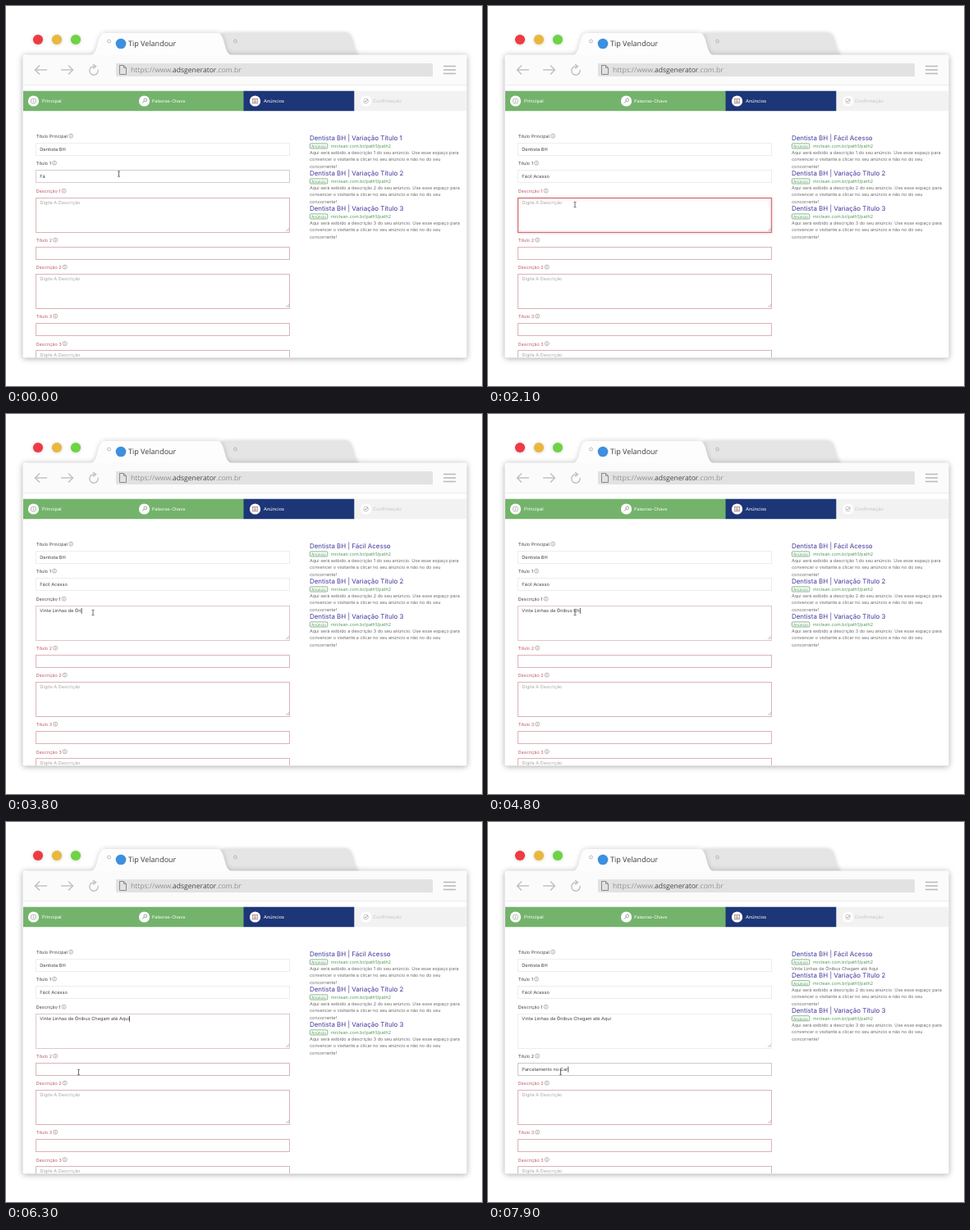
Animation of 580 by 464 pixels, one loop 8000 ms. Source, as an HTML page with a canvas:

```html
<!DOCTYPE html>
<html lang="pt-BR">
<head>
<meta charset="utf-8">
<title>Tip Velandour</title>
<style>
  html, body { margin: 0; width: 580px; height: 464px; overflow: hidden; background: #fff; }
  canvas { display: block; }
</style>
</head>
<body>
<canvas id="stage" width="580" height="464"></canvas>
<script>
const ctx = document.getElementById('stage').getContext('2d');
ctx.textRendering = 'geometricPrecision';

const LOOP = 8000;
const PAGE_FONT = 'Inter, sans-serif';
const BAR_FONT = '"Open Sans", sans-serif';
const INK = '#444', RED = '#bd5560', PINK = '#dcb3b7', SOFT_PINK = '#e0c8ca', PALE = '#ededed';
const CLICK_DESC = 1800, CLICK_TITLE2 = 6500;

// Each key is [time, characters typed so far].
const typing = {
  title1: { text: 'Fácil Acesso', keys: [[0, 2], [100, 3], [200, 4], [300, 6], [700, 7], [800, 9], [900, 10], [1000, 11], [1100, 12]] },
  desc1: {
    text: 'Vinte Linhas de Ônibus Chegam até Aqui',
    keys: [[2300, 3], [2500, 4], [2600, 5], [2700, 7], [2800, 9], [2900, 10], [3000, 12], [3100, 13], [3200, 14], [3300, 16],
      [3700, 17], [3800, 18], [3900, 20], [4100, 21], [4300, 22], [4400, 23], [4800, 25], [5100, 27], [5200, 30], [5300, 32],
      [5500, 34], [5700, 35], [5800, 36], [5900, 37], [6000, 38]]
  },
  title2: { text: 'Parcelamento no Cartão', keys: [[7200, 2], [7300, 4], [7400, 7], [7500, 9], [7600, 12], [7700, 14], [7800, 17], [7900, 19]] }
};
const caretHidden = [[0, 100], [500, 700], [1300, 2300], [3500, 3700], [6800, 7100]];

const within = (t, [from, to]) => t >= from && t < to;
const ramp = (t, from, to) => Math.min(1, Math.max(0, (t - from) / (to - from)));
const ease = p => p * p * (3 - 2 * p);

function typed({ text, keys }, t) {
  let count = 0;
  for (const [time, n] of keys) if (t >= time) count = n;
  return text.slice(0, count);
}

function text(str, x, y, size, color = INK, font = PAGE_FONT) {
  ctx.font = `${size}px ${font}`;
  ctx.fillStyle = color;
  ctx.fillText(str, x, y);
  return x + ctx.measureText(str).width;
}

function rect(x, y, w, h, color) {
  ctx.fillStyle = color;
  ctx.fillRect(x, y, w, h);
}

function disc(x, y, r, color) {
  ctx.fillStyle = color;
  ctx.beginPath();
  ctx.arc(x, y, r, 0, 7);
  ctx.fill();
}

function ring(x, y, r, color, width = 0.6) {
  ctx.strokeStyle = color;
  ctx.lineWidth = width;
  ctx.beginPath();
  ctx.arc(x, y, r, 0, 7);
  ctx.stroke();
}

function line(points, color, width = 1) {
  ctx.strokeStyle = color;
  ctx.lineWidth = width;
  ctx.beginPath();
  points.forEach(([x, y]) => ctx.lineTo(x, y));
  ctx.stroke();
}

function withShadow(color, blur, dy, draw) {
  ctx.save();
  ctx.shadowColor = color;
  ctx.shadowBlur = blur;
  ctx.shadowOffsetY = dy;
  draw();
  ctx.restore();
}

function info(x, y, r, color) {
  ring(x, y, r, color);
  line([[x, y - r * 0.15], [x, y + r * 0.55]], color, 0.7);
  rect(x - 0.35, y - r * 0.6, 0.7, 0.7, color);
}

function tab(left, right, slope, fill) {
  const top = 33, base = 60;
  ctx.fillStyle = fill;
  ctx.beginPath();
  ctx.moveTo(left, base);
  ctx.bezierCurveTo(left + slope * 0.6, base - 4, left + slope * 0.35, top, left + slope, top);
  ctx.lineTo(right - slope, top);
  ctx.bezierCurveTo(right - slope * 0.35, top, right - slope * 0.6, base - 4, right, base);
  ctx.fill();
}

function drawBrowser() {
  rect(0, 0, 580, 464, '#fff');
  [[39, '#ef3b43'], [62, '#e8b83d'], [85, '#6cd445']].forEach(([x, color]) =>
    withShadow('rgba(0,0,0,.18)', 4, 0.5, () => disc(x, 41, 6.1, color)));
  withShadow('rgba(0,0,0,.2)', 5, 0, () => tab(250, 431, 17, '#e5e5e5'));
  withShadow('rgba(0,0,0,.2)', 6, 0, () => tab(104, 274, 17, '#fdfdfd'));
  withShadow('rgba(0,0,0,.34)', 7, 1, () => {
    ctx.fillStyle = '#fff';
    ctx.beginPath();
    ctx.roundRect(20.5, 59.5, 541, 370, 2);
    ctx.fill();
  });
  tab(104, 274, 17, '#fdfdfd');
  rect(21, 60, 540, 36, '#fbfbfb');
  rect(21, 96, 540, 1, '#ececec');

  ring(125.5, 43, 1.9, '#aaa', 0.8);
  ring(279.5, 43, 1.9, '#aaa', 0.8);
  disc(140, 46, 6.3, '#3d8fe0');
  text('Tip Velandour', 149, 49.3, 9, '#3c3c3c', BAR_FONT);

  const gray = '#bcbcbc';
  line([[50, 78], [35.5, 78]], gray, 1.3);
  line([[41, 72.5], [35.5, 78], [41, 83.5]], gray, 1.3);
  line([[67, 78], [81.5, 78]], gray, 1.3);
  line([[76, 72.5], [81.5, 78], [76, 83.5]], gray, 1.3);
  ctx.beginPath();
  ctx.arc(107, 79, 5.2, -0.2, 4.9);
  ctx.stroke();
  line([[106, 71], [109.5, 73.7], [106, 76.5]], gray, 1.3);
  [73.5, 78, 82.5].forEach(y => line([[533, y], [548, y]], gray, 1.6));

  ctx.fillStyle = '#e2e2e2';
  ctx.beginPath();
  ctx.roundRect(134, 70, 386, 16, 1);
  ctx.fill();
  line([[138.5, 72.5], [143.5, 72.5], [146.5, 75.5], [146.5, 83.5], [138.5, 83.5], [138.5, 72.1]], '#808080', 0.9);
  line([[143.5, 72.5], [143.5, 75.5], [146.5, 75.5]], '#808080', 0.8);
  let x = text('https://www.', 152, 81, 8.55, '#909090', BAR_FONT);
  x = text('adsgenerator', x, 81, 8.55, '#444', BAR_FONT);
  text('.com.br', x, 81, 8.55, '#909090', BAR_FONT);
}

function drawSteps() {
  const top = 103.7, height = 24.5;
  rect(21, top, 269, height, '#73b36b');
  rect(424, top, 137, height, '#f2f2f2');
  rect(289.5, top, 134.8, height, '#1c3678');
  [33.5, 168.5, 303.5, 438.5].forEach(x => disc(x, 116, 6.6, '#fff'));
  info(33.5, 116, 3.2, '#888');
  ring(169.7, 114.8, 1.8, '#888', 0.8);
  line([[168.4, 116.1], [166, 118.5]], '#888', 0.9);
  ctx.strokeStyle = '#a5757b';
  ctx.lineWidth = 0.8;
  ctx.strokeRect(300.7, 113.2, 5.6, 5.6);
  [114.8, 116.2, 117.6].forEach(y => line([[301.8, y], [305.2, y]], '#a5757b', 0.7));
  ring(438.5, 116, 3, '#aaa');
  line([[437, 116], [438.2, 117.2], [441, 113.8]], '#888', 0.8);
  text('Principal', 44, 118, 5.8, '#fff');
  text('Palavras-Chave', 178, 118, 5.4, '#fff');
  text('Anúncios', 314, 118, 5.7, '#fff');
  text('Confirmação', 447, 118, 5.7, '#c4c4c4');
}

function label(str, y, color) {
  const end = text(str, 36.7, y + 2, 5.45, color);
  info(end + 4.2, y - 0.3, 2.5, color === RED ? '#9a7f82' : '#888');
}

function field(top, height, border, { value = '', caret = false, glow = 0 } = {}) {
  const box = [36.5, top + 0.5, 309, height];
  ctx.lineWidth = 1;
  ctx.strokeStyle = border;
  ctx.strokeRect(...box);
  if (glow) {
    ctx.globalAlpha = glow;
    withShadow('rgba(200,50,60,.6)', 3, 0, () => {
      ctx.strokeStyle = '#cc7078';
      ctx.strokeRect(...box);
    });
    ctx.globalAlpha = 1;
  }
  const area = height > 20;
  if (area) {
    line([[341, top + 41], [345, top + 37]], '#aaa', 0.7);
    line([[343, top + 41], [345, top + 39]], '#aaa', 0.7);
  }
  const base = top + (area ? 8.2 : 10);
  const end = area && !value
    ? text('Digite A Descrição', 41.5, base, 5.6, '#a8a8a8')
    : text(value, 41.3, base, 5.65, INK);
  if (caret) rect(end + 0.2, base - 5.4, 0.8, 7, '#333');
}

function drawForm(t) {
  const caret = !caretHidden.some(span => within(t, span));
  const title1 = typed(typing.title1, t);
  const desc1 = typed(typing.desc1, t);
  const title2 = typed(typing.title2, t);
  const onDesc = within(t, [CLICK_DESC, CLICK_TITLE2]);
  const onTitle2 = t >= CLICK_TITLE2;

  label('Título Principal', 159, INK);
  field(167, 15, PALE, { value: 'Dentista BH' });
  label('Título 1', 192, INK);
  field(200, 15, t < CLICK_DESC ? '#d8ccce' : PALE, { value: title1, caret: caret && t < CLICK_DESC });
  label('Descrição 1', 226, desc1 ? INK : RED);
  field(234, 42, !desc1 ? PINK : onDesc ? SOFT_PINK : PALE, {
    value: desc1,
    caret: caret && onDesc,
    glow: desc1 ? 0 : ramp(t, CLICK_DESC - 100, 2100)
  });
  label('Título 2', 286, title2 ? INK : RED);
  field(294, 15, title2 ? '#cacaca' : onTitle2 ? '#c4717a' : PINK, { value: title2, caret: caret && onTitle2 });
  label('Descrição 2', 319, RED);
  field(327, 42, PINK);
  label('Título 3', 379, RED);
  field(387, 15, PINK);
  label('Descrição 3', 412.5, RED);
  field(420, 42, PINK);
}

function ad(y, title, lines) {
  const green = '#559a5c';
  text('Dentista BH | ' + title, 370, y + 2.9, 7.95, '#41369c');
  ctx.strokeStyle = green;
  ctx.lineWidth = 0.7;
  ctx.beginPath();
  ctx.roundRect(370.4, y + 6.4, 21.4, 6.1, 1);
  ctx.stroke();
  text('Anúncio', 372, y + 11.3, 4.7, green);
  text('mrclean.com.br/path1/path2', 396, y + 11.2, 5.5, green);
  lines.forEach((str, i) => text(str, 370, y + 19.3 + i * 8.55, 5.48, '#6a6a6a'));
  return y + 17.2 + lines.length * 8.6;
}

function drawAds(t) {
  const sample = n => [
    `Aqui será exibido a descrição ${n} do seu anúncio. Use esse espaço para`,
    'convencer o visitante a clicar no seu anúncio e não no do seu',
    'concorrente!'
  ];
  let y = 161.5;
  y = ad(y, t < CLICK_DESC ? 'Variação Título 1' : typing.title1.text,
    t < CLICK_TITLE2 ? sample(1) : [typing.desc1.text]);
  y = ad(y, 'Variação Título 2', sample(2));
  ad(y, 'Variação Título 3', sample(3));
}

function drawPointer(t) {
  const first = ease(ramp(t, 1200, 1700)), second = ease(ramp(t, 5800, 6300));
  const x = 137.5 - 31.5 * first - 17.5 * second;
  const y = 205 + 37.5 * first + 63 * second;
  line([[x, y - 3], [x, y + 3]], '#444', 0.8);
  [-3.2, 3.2].forEach(dy => line([[x - 1.6, y + dy], [x + 1.6, y + dy]], '#555', 0.7));
}

function render(t) {
  drawBrowser();
  ctx.save();
  ctx.beginPath();
  ctx.rect(21, 97, 540, 332);
  ctx.clip();
  drawSteps();
  drawForm(t);
  drawAds(t);
  drawPointer(t);
  ctx.restore();
}

let start;
function tick(now) {
  start ??= now;
  const t = (now - start) % LOOP;
  render(Math.floor(t / 100) * 100);
  requestAnimationFrame(tick);
}
render(0);
requestAnimationFrame(tick);
</script>
</body>
</html>
```
